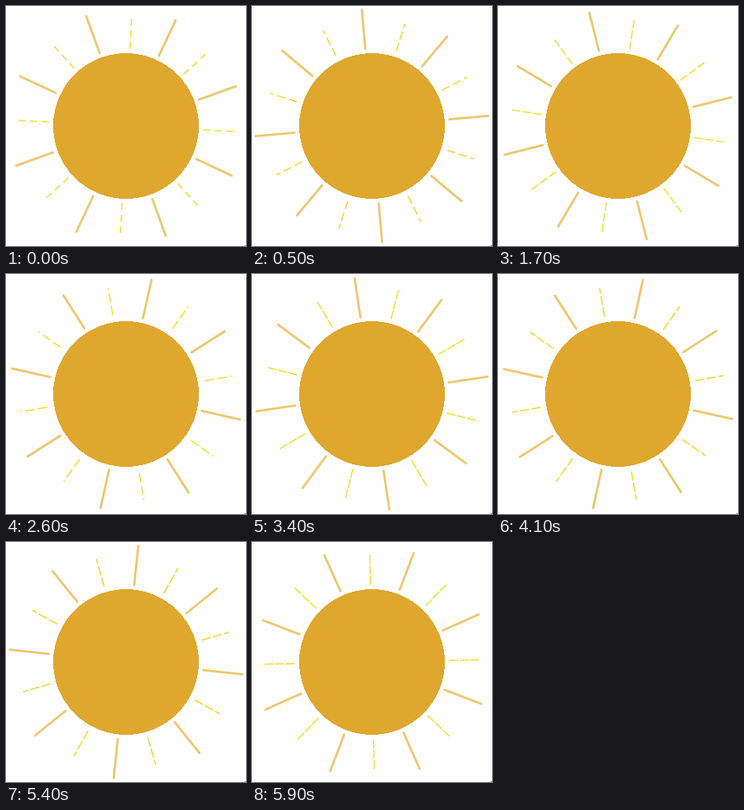
An HTML page that plays this animation: 300 px wide and 300 px high, repeating every 6 s.

```html
<!DOCTYPE html>
<html lang="en">
<head>
<meta charset="utf-8">
<title>Sun</title>
<style>
html, body { margin: 0; width: 100%; height: 100%; overflow: hidden; background: #fff; }
svg { display: block; width: 100vw; height: 100vh; }
</style>
</head>
<body>
<svg viewBox="0 0 300 300">
  <g id="rays" fill="none">
    <path id="solid" stroke="#efc66e" stroke-width="2.8" stroke-linecap="round"/>
    <path id="dashed" stroke-width="1.5"/>
  </g>
  <circle cx="150" cy="150" r="91" fill="#dfa72e" shape-rendering="crispEdges"/>
  <rect x="298" y="299" width="2" height="1" fill="#999"/>
</svg>
<script>
const LOOP = 6000, STEP = 100, TURN = 2.98;
const $ = id => document.getElementById(id);
const solid = $('solid'), dashed = $('dashed'), rays = $('rays');

// time, dash, gap, inner lead, green channel
const KNOTS = [
  [0, 9, 5.5, 0, 224],
  [1000, 12, 4, 4, 212],
  [1700, 10.5, 3, 0, 226],
  [2600, 12, 4, 3.5, 226],
  [3400, 11.5, 1.6, 0, 226],
  [4900, 12, 4, 3.5, 208],
  [5900, 11.5, 1.6, 0, 224],
  [6000, 9, 5.5, 0, 224]
];

function spokes(from, to, offset) {
  let d = '';
  for (let i = 0; i < 8; i++) {
    const a = (offset + i * 45) * Math.PI / 180;
    const at = r => (150 + r * Math.sin(a)).toFixed(2) + ' ' + (150 - r * Math.cos(a)).toFixed(2);
    d += 'M' + at(from) + 'L' + at(to);
  }
  return d;
}

function sample(t) {
  const i = KNOTS.findIndex(k => k[0] > t);
  const a = KNOTS[i - 1], b = KNOTS[i];
  const p = (t - a[0]) / (b[0] - a[0]);
  return a.map((v, j) => v + (b[j] - v) * p);
}

solid.setAttribute('d', spokes(97, 146, 22.15));
dashed.setAttribute('d', spokes(96.5, 134, 0));

function draw(time) {
  const n = Math.floor((time % LOOP) / STEP);
  const [, dash, gap, lead, green] = sample(n * STEP);
  rays.setAttribute('transform', `rotate(${(n + 1) * TURN} 150 150)`);
  dashed.setAttribute('stroke-dasharray', dash + ' ' + gap);
  dashed.setAttribute('stroke-dashoffset', -lead);
  dashed.setAttribute('stroke', `rgb(236,${Math.round(green)},44)`);
}

const start = performance.now();
function tick() {
  draw(performance.now() - start);
  requestAnimationFrame(tick);
}
tick();
</script>
</body>
</html>
```
